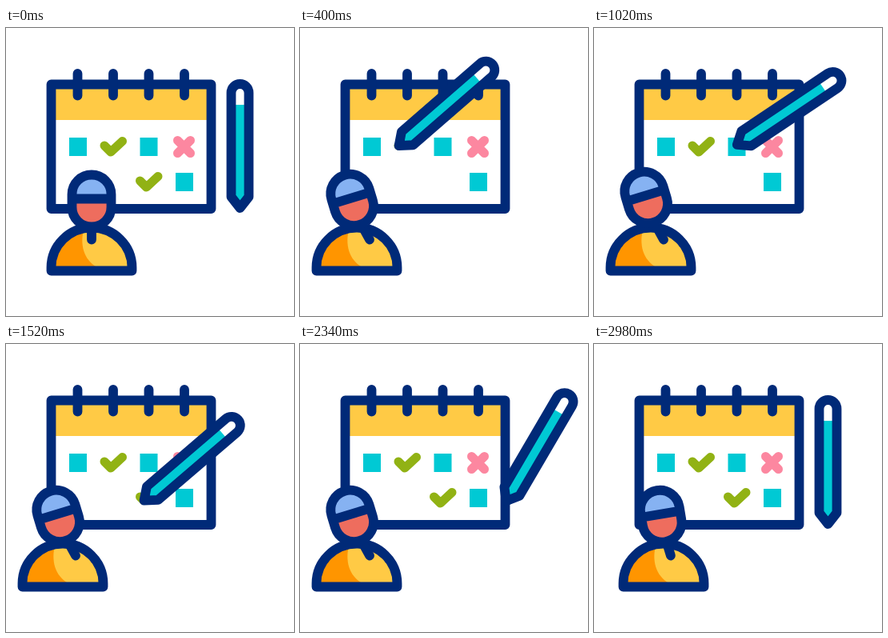
These frames come from a looping animation (360 by 360 pixels, 3 s). An HTML page:

```html
<!DOCTYPE html>
<html lang="en">
<head>
<meta charset="utf-8">
<title>Calendar planning</title>
<style>
html, body { margin: 0; width: 100%; height: 100%; overflow: hidden; background: #fff; }
svg { display: block; width: 100%; height: 100%; }
.line, .mark { fill: none; stroke-width: 11.8; stroke-linecap: round; stroke-linejoin: round; }
.line { stroke: #002a78; }
.mark { stroke-width: 11; }
</style>
</head>
<body>
<svg viewBox="0 0 360 360">
  <path d="M57 71h199v44H57z" fill="#ffca45"/>
  <rect class="line" x="56.5" y="70.5" width="200" height="155.5"/>
  <path class="line" d="M89.500 57v27.500M134 57v27.500M178.500 57v27.500M223 57v27.500"/>
  <path d="M79 137h22v23h-22zM167.500 137h22v23h-22zM212 181h22v23h-22z" fill="#00c9d4"/>
  <path class="mark" d="M214.500 140.500l16 16m0-16l-16 16" stroke="#fc87a0"/>
  <path class="mark check" d="M123 147l8 8 14.500-13.500" stroke="#91b214"/>
  <path class="mark check" d="M167.500 191l8 8 14.500-13.500" stroke="#91b214"/>

  <g id="person">
    <path d="M56.500 303.500v-4a50.500 50 0 0 1 101 0v4z" fill="#ffca45"/>
    <path d="M56.500 303.500v-4a50.500 50 0 0 1 41-49C92 270 97 290 114 299v4.500z" fill="#ff9500"/>
    <path class="line" d="M56.500 303.500v-4a50.500 50 0 0 1 101 0v4z"/>
    <path class="line" id="collar"/>
    <g id="head">
      <path d="M82.500 214v10a24.500 24.500 0 0 0 49 0v-10z" fill="#ee6d5e"/>
      <path d="M82.500 214v-6a24.500 24.500 0 0 1 49 0v6z" fill="#86b2f2"/>
      <path class="line" d="M82.500 208a24.500 24.500 0 0 1 49 0v16a24.500 24.500 0 0 1-49 0zM82.500 213.500h49"/>
    </g>
  </g>

  <!-- The pen's outer tip is the local origin -->
  <g id="pen">
    <path d="M-11-20v-130a11 11 0 0 1 22 0V-20L0-6z" fill="#fff"/>
    <path d="M-11-135h22V-20L0-6-11-20z" fill="#00c9d4"/>
    <path class="line" d="M-11-20v-130a11 11 0 0 1 22 0V-20L0-6z"/>
  </g>
</svg>
<script>
const LOOP = 3000, WRITE = 300;
const $ = id => document.getElementById(id);
const checks = [...document.querySelectorAll('.check')];

const clamp = v => Math.min(1, Math.max(0, v));
const mix = (a, b, u) => a + (b - a) * u;
const progress = (t, from, to) => clamp((t - from) / (to - from));
const ease = (t, from, to) => {
  const u = progress(t, from, to);
  return u * u * (3 - 2 * u);
};

// Each pose is [tip x, tip y, angle]
const rest = (from, to, ...pose) => ({ from, to, pose: () => pose });
const write = (check, from, a0, a1) => ({
  check, from, to: from + WRITE,
  pose(u) {
    const p = check.getPointAtLength(u * check.getTotalLength());
    return [p.x - 4, p.y + 4, mix(a0, a1, u)];
  }
});

const steps = [
  rest(0, 40, 292.5, 231, 0),
  write(checks[0], 400, 49, 52),
  rest(1130, 1130, 180, 150, 57),
  write(checks[1], 1460, 51, 43),
  rest(2130, 2220, 249, 197, 35),
  rest(2750, LOOP, 292.5, 231, 0)
];

function penPose(t) {
  const i = steps.findIndex(s => t <= s.to), step = steps[i];
  if (t >= step.from) return step.pose(progress(t, step.from, step.to));
  const last = steps[i - 1], next = step.pose(0), u = ease(t, last.to, step.from);
  return last.pose(1).map((v, k) => mix(v, next[k], u));
}

function draw(t) {
  const [x, y, angle] = penPose(t);
  $('pen').setAttribute('transform', `translate(${x} ${y}) rotate(${angle})`);

  const lean = ease(t, 0, 340) * (1 - ease(t, 2740, 3260));
  const nod = 3 * Math.sin(Math.PI * progress(t, 800, 1240)) ** 2;
  $('person').setAttribute('transform', `translate(${-36 * lean} 0)`);
  $('head').setAttribute('transform',
    `translate(0 ${-nod - 2 * lean}) rotate(${-17 * lean} 107 236)`);
  $('collar').setAttribute('d', `M${107 + 8 * lean} 250L${107 + 16 * lean} 264.5`);

  // Old checks fade out, then the pen draws them again
  for (const { check, from, to } of steps.filter(s => s.check)) {
    const fade = 1 - progress(t, 40, 240), part = progress(t, from, to);
    const length = check.getTotalLength();
    check.style.opacity = fade || +(part > 0);
    check.style.strokeDasharray = fade || part === 1 ? 'none' : `${part * length} ${length * 2}`;
  }
}

const start = performance.now();
function tick() {
  draw((performance.now() - start) % LOOP);
  requestAnimationFrame(tick);
}
tick();
</script>
</body>
</html>
```
